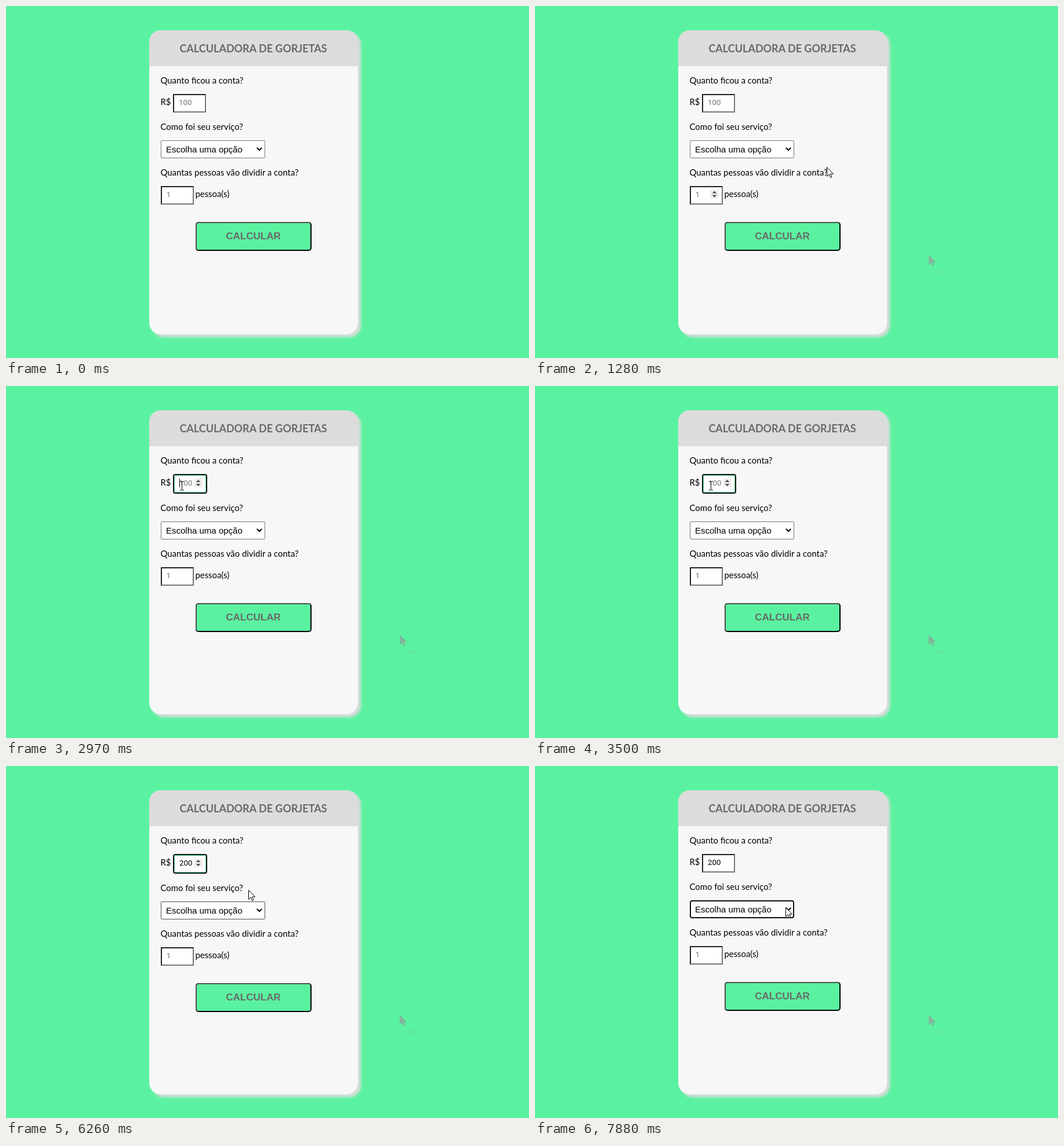
Write an HTML page that moves like this. It is 902 by 608 pixels and loops after 8 s.

```html
<!DOCTYPE html>
<html lang="pt-BR">
<head>
<meta charset="utf-8">
<title>Calculadora de gorjetas</title>
<style>
  html, body { margin: 0; width: 100%; height: 100%; overflow: hidden; background: #5af2a0; }
  svg { display: block; width: 902px; height: 608px; }
  text { font: 14.87px Lato, sans-serif; fill: #000; }
  .title { font-size: 18px; font-weight: 700; fill: #696969; text-anchor: middle; }
  .field { font: 13.333px Roboto, sans-serif; }
  .hint { fill: #757575; }
  .option { font: 15px "Liberation Sans", Arial, sans-serif; }
  .button { font: 700 17px "Liberation Sans", Arial, sans-serif; fill: #696969; text-anchor: middle; }
  .card { filter: drop-shadow(5px 5px 2.5px #dcdcdc); }
</style>
</head>
<body>
<svg viewBox="0 0 902 608">
  <defs>
    <clipPath id="buttonShape"><rect x="327" y="373" width="200" height="50" rx="5"/></clipPath>
    <path id="arrowShape" d="M.5 .5V16.2L4.2 12.8L6.7 18.4L9 17.4L6.6 12H11.5Z"/>
    <g id="spinner">
      <rect x="-7.5" y="-7.5" width="15" height="15" fill="#efefef"/>
      <path d="M-4 -1.5L0 -5.5L4 -1.5ZM-4 1.5L0 5.5L4 1.5Z" fill="#505050"/>
    </g>
    <g id="inset">
      <rect width="57" height="32" fill="#767676"/>
      <path d="M0 0H57L55 2L2 30L0 32Z" fill="#212121"/>
      <rect x="2" y="2" width="53" height="28" fill="#fff"/>
    </g>
  </defs>

  <rect width="902" height="608" fill="#5af2a0"/>
  <g class="card">
    <rect x="247" y="42" width="360" height="525" rx="20" fill="#f7f7f7"/>
    <path d="M247 104V62a20 20 0 0 1 20 -20H587a20 20 0 0 1 20 20V104Z" fill="#dcdcdc"/>
  </g>
  <text class="title" x="426.5" y="79.5">CALCULADORA DE GORJETAS</text>
  <text x="266.5" y="134">Quanto ficou a conta?</text>

  <use id="amountBox" href="#inset" x="288" y="152"/>
  <g id="amountRing">
    <rect x="289" y="153" width="57" height="32" rx="3" fill="#fff" stroke="#101010" stroke-width="2"/>
    <rect x="290.5" y="154.5" width="54" height="29" rx="1" fill="none" stroke="#4fe596"/>
  </g>
  <g id="amountRow">
    <text id="currency" y="171">R$</text>
    <use id="amountSpinner" href="#spinner" x="330.5" y="166.5"/>
    <text id="amount" class="field" x="298" y="171"></text>
    <rect id="caret" y="159" width="1" height="15"/>
  </g>

  <g id="lower">
    <text x="266.5" y="214">Como foi seu serviço?</text>
    <rect id="select" fill="#fff"/>
    <text class="option" x="276" y="253">Escolha uma opção</text>
    <path d="M432.8 244.8L437 249L441.2 244.8" fill="none" stroke="#000" stroke-width="2"/>
    <text x="266.5" y="293">Quantas pessoas vão dividir a conta?</text>
    <use href="#inset" x="267" y="311"/>
    <text class="field hint" x="276.5" y="330">1</text>
    <use id="peopleSpinner" href="#spinner" x="309.5" y="325"/>
    <text x="326.5" y="330">pessoa(s)</text>
    <g clip-path="url(#buttonShape)">
      <rect x="327" y="373" width="200" height="50" fill="#000"/>
      <path d="M327 373H527L523 377L331 419L327 423Z" fill="#505050"/>
      <rect x="329" y="375" width="196" height="46" rx="3" fill="#5af2a0"/>
    </g>
    <text class="button" x="426.5" y="403">CALCULAR</text>
  </g>

  <g id="trail" fill="#80b79c" stroke="#80b79c">
    <use href="#arrowShape" x="679" y="430"/>
    <path d="M694 460L699 458.5M699 462L703 462M703 457.5L706 456.5" fill="none"/>
  </g>
  <use id="arrow" href="#arrowShape" fill="#fff" stroke="#000"/>
  <path id="beam" d="M-3.5 -7.5H-1L0 -6.5L1 -7.5H3.5M0 -6.5V6.5M-3.5 7.5H-1L0 6.5L1 7.5H3.5" fill="none" stroke="#000"/>
</svg>

<script>
const LOOP = 8000;
const CHAR = 7.415;
const $ = id => document.getElementById(id);
const show = (id, on) => $(id).setAttribute('visibility', on ? 'visible' : 'hidden');
const within = (v, from, to) => v >= from && v < to;
const move = (id, x, y) => $(id).setAttribute('transform', `translate(${x} ${y})`);
const smooth = p => p * p * (3 - 2 * p);

const entry = { x: 800, y: 595 };
const gestures = [
  { start: 190, end: 460, steps: 5, via: { x: 720, y: 480 }, to: { x: 694, y: 442 } },
  { start: 920, end: 1280, steps: 6, via: { x: 0, y: 350 }, to: { x: 503, y: 278 } },
  { start: 1610, end: 2090, steps: 8, via: { x: 330, y: 130 }, to: { x: 284, y: 174.5 } },
  { start: 2160, end: 2570, steps: 6, via: { x: 290, y: 176 }, to: { x: 303.5, y: 172.5 } },
  { start: 4510, end: 4650, steps: 3, via: { x: 380, y: 260 }, to: { x: 418, y: 214 } },
  { start: 7310, end: 7880, steps: 9, via: { x: 395, y: 232 }, to: { x: 432, y: 244 } }
];

function pointerAt(t) {
  const index = gestures.findLastIndex(g => t >= g.start);
  if (index < 0) return null;
  const { start, end, steps, via, to } = gestures[index];
  const from = index ? gestures[index - 1].to : entry;
  const interval = (end - start) / (steps - 1);
  const step = Math.min(steps, 1 + Math.floor((t - start) / interval + 0.05));
  const p = smooth(step / steps);
  const along = axis => (1 - p) ** 2 * from[axis] + 2 * p * (1 - p) * via[axis] + p * p * to[axis];
  return { x: along('x'), y: along('y') };
}

function drawPointer(t) {
  const point = pointerAt(t);
  const overText = point && (
    within(point.x, 266, 345) && within(point.y, 146, 186) ||
    within(point.x, 267, 324) && within(point.y, 311, 343));
  show('arrow', point && !overText);
  show('beam', overText);
  if (point) move(overText ? 'beam' : 'arrow', point.x, point.y);
  show('trail', t >= 985);
}

function drawAmount(t, focused) {
  const typed = [4980, 5510, 5730].filter(at => t >= at).length;
  const shift = focused ? 1 : 0;
  $('amount').textContent = typed ? '200'.slice(0, typed) : '100';
  $('amount').setAttribute('class', typed ? 'field' : 'field hint');
  $('caret').setAttribute('x', Math.floor(298 + typed * CHAR));
  show('caret', within(t, 2970, 3500) || within(t, 4050, 4580) || within(t, 4980, 6260));
  show('amountSpinner', within(t, 2285, 6720));
  show('amountBox', !focused);
  show('amountRing', focused);
  move('amountRow', shift, shift);
  $('currency').setAttribute('x', 266.5 - shift);
}

function drawSelect(t) {
  const focused = t >= 6720;
  const line = focused ? 2 : 1;
  const box = {
    x: 267 + line / 2, y: 232 + line / 2, width: 180 - line, height: 31 - line,
    rx: focused ? 3 : 1, 'stroke-width': line,
    stroke: focused ? '#101010' : t >= 4580 ? '#4f4f4f' : '#767676'
  };
  for (const key in box) $('select').setAttribute(key, box[key]);
}

function draw(t) {
  const focused = within(t, 2970, 6720);
  drawAmount(t, focused);
  move('lower', 0, focused ? 2 : 0);
  drawSelect(t);
  show('peopleSpinner', within(t, 1130, 1610));
  drawPointer(t);
}

const began = performance.now();
function frame() {
  draw((performance.now() - began) % LOOP);
  requestAnimationFrame(frame);
}
draw(0);
requestAnimationFrame(frame);
</script>
</body>
</html>
```
